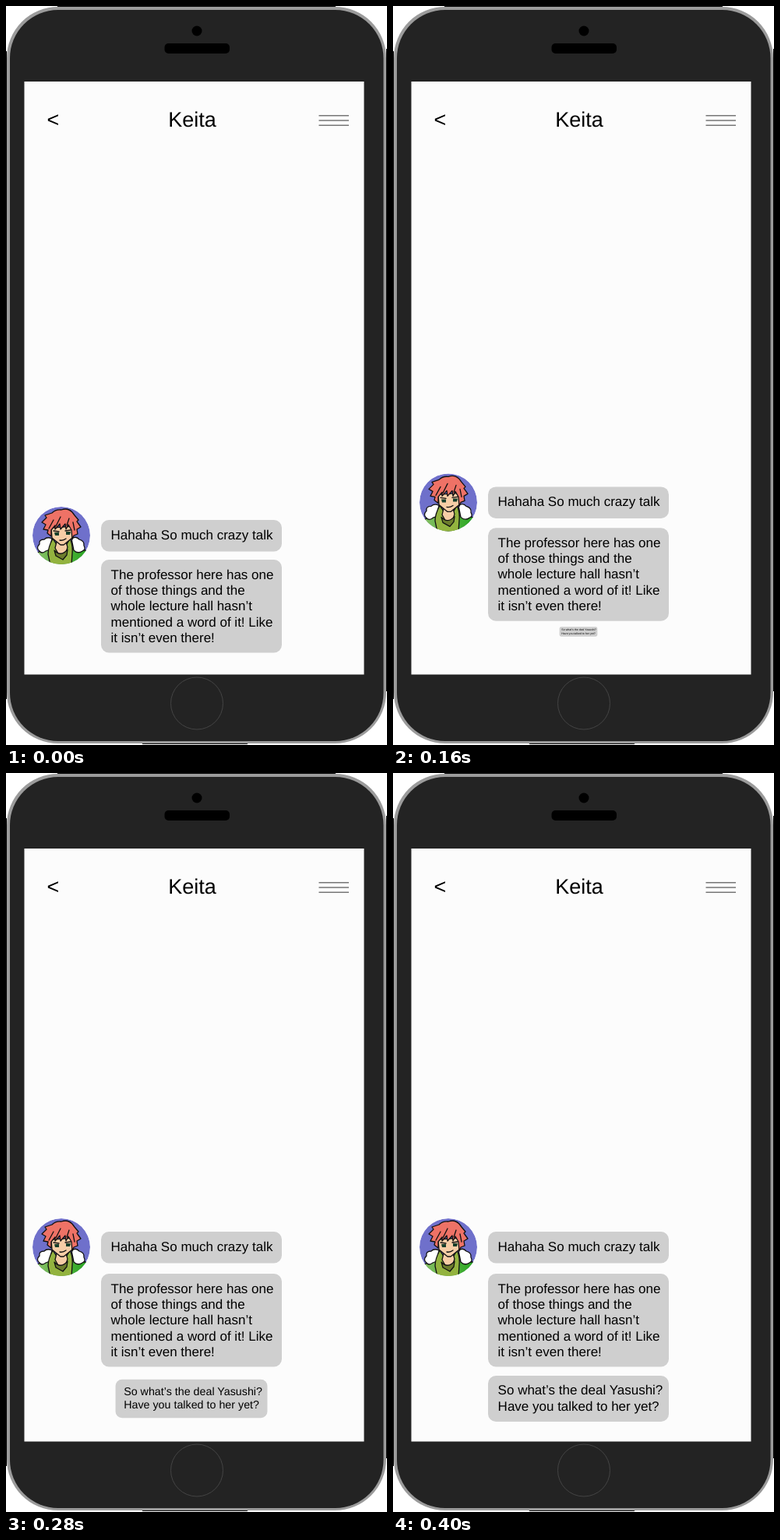
Recreate the animation shown at these times as an HTML page. Size 489x949 px, loop 1040 ms.

```html
<!DOCTYPE html>
<html lang="en">
<head>
<meta charset="utf-8">
<title>Chat</title>
<style>
  html, body { margin: 0; width: 100%; height: 100%; overflow: hidden; background: #fff; }
  svg { display: block; width: 489px; height: 949px; }
  text { font: 17px "Liberation Sans", Arial, sans-serif; text-rendering: geometricPrecision; }
  .head { font-size: 27px; }
  .bubble { fill: #cfcfcf; }
  .ink { stroke: #111; stroke-width: 1.3; stroke-linejoin: round; stroke-linecap: round; }
</style>
</head>
<body>
<svg viewBox="0 0 489 949">
  <defs>
    <clipPath id="disc"><circle r="37"/></clipPath>
    <linearGradient id="coat">
      <stop offset="0" stop-color="#8fc26a"/>
      <stop offset="1" stop-color="#22a51c"/>
    </linearGradient>
  </defs>

  <!-- phone -->
  <path d="M66 .5H423M.5 58V890M488.5 55V880M175 947.5H310" stroke="#000"/>
  <rect x="1" y="1" width="487" height="946" rx="66" fill="#9b9b9b"/>
  <rect x="5" y="5" width="479.5" height="939" rx="62" fill="#232323"/>
  <circle cx="245" cy="32" r="6.5"/>
  <rect x="203.5" y="48" width="83.5" height="13" rx="5"/>
  <circle cx="245" cy="895.5" r="33.5" fill="none" stroke="#444"/>
  <rect x="23.5" y="97" width="436" height="761.5" fill="#fcfcfc"/>

  <!-- header -->
  <text class="head" x="52.5" y="155">&lt;</text>
  <text class="head" x="239" y="155" text-anchor="middle">Keita</text>
  <path d="M401.5 140.8H440M401.5 147H440M401.5 153.2H440" stroke="#777" stroke-width="1.6"/>

  <g id="first">
    <g transform="translate(71 680)" clip-path="url(#disc)">
      <circle r="37" fill="#6f70cb"/>
      <path class="ink" fill="url(#coat)" d="M-37 25L-20 17L18 17L37 20V38H-37Z"/>
      <path class="ink" fill="#fff" d="M-12 4Q-18 1-22 5Q-29 5-28 11Q-33 16-28 20Q-25 24-20 20L-15 18Z"/>
      <path class="ink" fill="#fff" d="M13 4Q19 0 23 5Q30 7 29 13Q32 18 27 20Q21 24 16 19Z"/>
      <path class="ink" fill="#93b33f" d="M-11 4Q-17 15-17 24L-14 38H13L14 23Q15 12 11 4L6 13H-5Z"/>
      <path class="ink" fill="#f6cda6" d="M-6 8L-8 16L-3 25H5L8 15L6 8Z"/>
      <path class="ink" fill="#6d7d2d" d="M-9 19Q-1 28 8 18L7 25L2 31L-7 26Z"/>
      <path class="ink" fill="#f6cda6" d="M-13-10L-12 3L-1 12H3L14 3L16-12Z"/>
      <path d="M-9-4H-3V0H-8ZM6-5H12L11-1H6Z" fill="#173f2c"/>
      <path class="ink" fill="none" d="M-10-6L-3-5M5-6L12-7M-2 6Q2 7 6 4"/>
      <path class="ink" fill="#ee7266" d="M-13 1L-18-3L-17-7L-23-8L-20-14L-25-17L-19-23L-21-26L-12-29Q-7-34 0-33Q8-36 14-30L17-26L22-20L20-18L25-11L20-8L21-2L16 0L14 5L13-7L9-14L6-8L5-15L-1-8L-2-15L-8-8L-8-13L-13-7Z"/>
      <path class="ink" fill="none" d="M-16-9L-10-20M-7-12L-1-24M7-13L10-22M17-7L15-17"/>
    </g>
    <rect class="bubble" x="122" y="660" width="232" height="40.5" rx="10"/>
    <text x="134.6" y="685">Hahaha So much crazy talk</text>
  </g>

  <g id="second">
    <rect class="bubble" x="122" y="711" width="232" height="119.5" rx="10"/>
    <text y="735.5">
      <tspan x="134.6">The professor here has one</tspan>
      <tspan x="134.6" dy="20.4">of those things and the</tspan>
      <tspan x="134.6" dy="20.4">whole lecture hall hasn’t</tspan>
      <tspan x="134.6" dy="20.4">mentioned a word of it! Like</tspan>
      <tspan x="134.6" dy="20.4">it isn’t even there!</tspan>
    </text>
  </g>

  <g id="third" transform="translate(238 803.5) scale(0)">
    <rect class="bubble" x="-116" y="-29.5" width="232" height="59" rx="10"/>
    <text y="-5.3">
      <tspan x="-103.4">So what’s the deal Yasushi?</tspan>
      <tspan x="-103.4" dy="20.4">Have you talked to her yet?</tspan>
    </text>
  </g>
</svg>
<script>
  const LOOP = 1040, STEP = 40;
  const place = (id, value) => document.getElementById(id).setAttribute("transform", value);

  // Grows past full size, then settles back to 1.
  const popScale = n => n <= 7 ? Math.max(0, n - 2) * 0.21 : Math.max(1, 1.05 - (n - 7) * 0.025);

  function draw() {
    const n = Math.max(0, Math.floor(performance.now() % LOOP / STEP) - 1);
    const rise = Math.min(n, 5);
    place("first", `translate(0 ${-14.2 * rise})`);
    place("second", `translate(0 ${-13.6 * rise})`);
    place("third", `translate(238 803.5) scale(${popScale(n)})`);
    requestAnimationFrame(draw);
  }
  draw();
</script>
</body>
</html>
```
